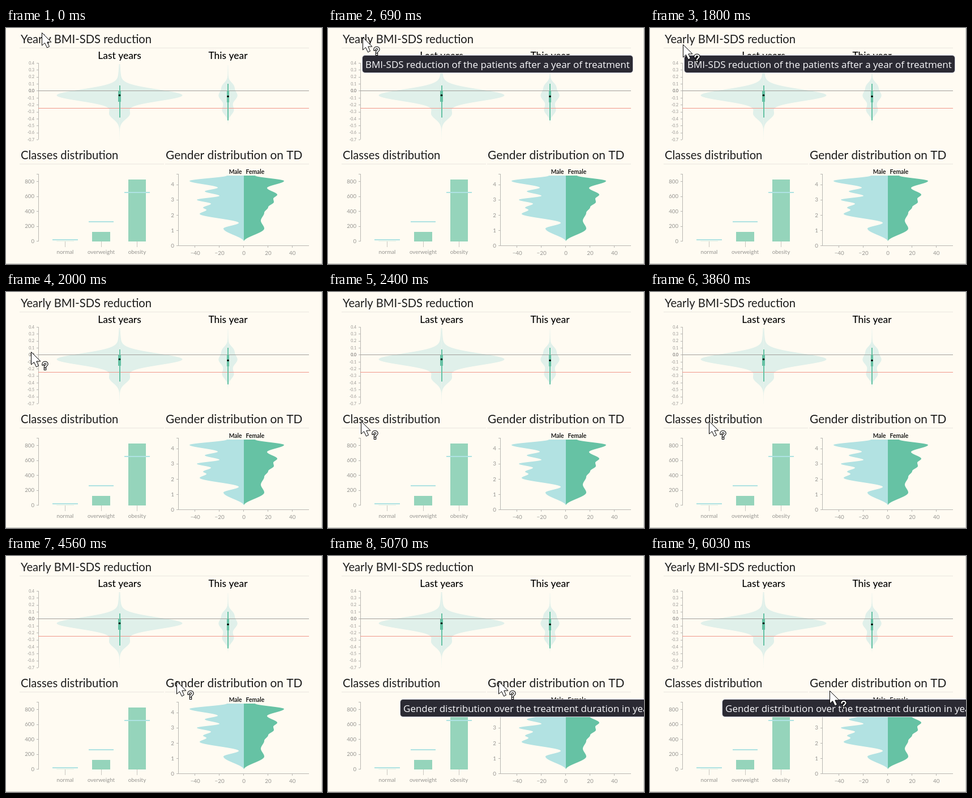
An HTML page with a canvas for the animation above (6.13 s loop, 558 by 419 pixels).

```html
<!DOCTYPE html>
<html lang="en">
<head>
<meta charset="utf-8">
<title>Treatment dashboard</title>
<style>
  html, body { margin: 0; width: 100%; height: 100%; overflow: hidden; background: #fffbf2; }
  canvas { display: block; }
</style>
</head>
<body>
<canvas id="stage" width="558" height="419"></canvas>
<script>
const ctx = document.getElementById('stage').getContext('2d');
const LOOP = 6130, STEP = 100;
const SANS = 'Lato, sans-serif';
const GREEN = '#66c2a4', AQUA = '#b2e2e2', AXIS = '#b9b7b2', LABEL = '#969591';

const smooth = p => p * p * (3 - 2 * p);

// Width as a sum of bell curves, each [height, centre, spread].
const density = bells => y =>
  bells.reduce((sum, [h, c, s]) => sum + h * Math.exp(-((y - c) ** 2) / (2 * s * s)), 0);

// Width that eases between turning points, each [width, y].
const turns = points => y => {
  const i = Math.max(1, points.findIndex(p => p[1] >= y));
  const [a, y0] = points[i - 1], [b, y1] = points[i];
  return a + (b - a) * smooth((y - y0) / (y1 - y0));
};

const lastYears = density([[107, 119.5, 10.3], [16, 153, 9], [4, 115, 30]]);
const thisYear = density([[16, 120, 9.5], [7, 102, 6], [10, 146, 8], [0.8, 100, 22]]);
const male = turns([[30, 262], [96, 271.5], [46, 283.5], [69, 290], [43, 298], [83, 305], [58, 312],
  [72, 319], [66, 323], [78, 330], [9, 346], [36, 356], [0, 379]]);
const female = turns([[20, 262], [71, 271.5], [41, 284], [59, 296], [52, 303], [53, 309], [43, 318],
  [36, 328], [30, 342], [36, 356], [0, 379]]);

const moves = [
  { at: 0, steps: 1, to: [61, 16] },
  { at: 1700, steps: 7, to: [58, 229], bow: [-17, 6] },
  { at: 3660, steps: 7, to: [289, 216], bow: [0, 4] },
  { at: 4360, steps: 2, to: [301, 222] },
  { at: 5930, steps: 1, to: [317, 239] }
];

const tips = [
  { from: 690, to: 1900, x: 61, y: 49, w: 477, label: 'BMI-SDS reduction of the patients after a year of treatment' },
  { from: 2950, to: 3860, x: 43, y: 259, w: 560, label: 'Distribution of the obesity classes (normal, overweight, and obesity)' },
  { from: 5070, to: LOOP, x: 128, y: 255, w: 480, label: 'Gender distribution over the treatment duration in years' }
];

function text(str, x, y, size, { color = LABEL, align = 'left', weight = 400, family = SANS } = {}) {
  ctx.font = `${weight} ${size}px ${family}`;
  ctx.fillStyle = color;
  ctx.textAlign = align;
  ctx.fillText(str, x, y);
}

function rect(x, y, w, h, color) {
  ctx.fillStyle = color;
  ctx.fillRect(x, y, w, h);
}

const hLine = (x1, x2, y, color = AXIS, h = 1) => rect(x1, y, x2 - x1, h, color);
const vLine = (x, y1, y2, color = AXIS, w = 1) => rect(x, y1, w, y2 - y1, color);

function heading(str, x, y, size, lineFrom, lineTo) {
  text(str, x, y, size, { color: '#1c1c1c' });
  hLine(lineFrom, lineTo, y + 8, '#e9e6df');
}

// Fills one side of a centre line; sign is -1 for left, 1 for right.
function side(width, center, sign, top, bottom, color) {
  ctx.beginPath();
  ctx.moveTo(center, top);
  for (let y = top; y <= bottom; y += 0.5) ctx.lineTo(center + sign * width(y), y);
  ctx.lineTo(center, bottom);
  ctx.fillStyle = color;
  ctx.fill();
}

function violin(width, center, top, bottom) {
  for (const sign of [-1, 1]) side(width, center, sign, top, bottom, '#e0f0ea');
}

function boxPlot(x, top, bottom, boxWidth, boxBottom, median) {
  vLine(x - 1, top, bottom, GREEN, 2);
  rect(x - Math.ceil(boxWidth / 2), 112, boxWidth, boxBottom - 112, GREEN);
  ctx.beginPath();
  ctx.arc(x - boxWidth % 2 / 2, median, 1.8, 0, Math.PI * 2);
  ctx.fillStyle = '#000';
  ctx.fill();
}

function yAxis(x, top, bottom, zeroY, gap, labels, size) {
  vLine(x, top, bottom);
  hLine(x - 3, x, top);
  labels.forEach((label, i) => {
    const y = zeroY - i * gap;
    hLine(x - 3, x, Math.round(y));
    text(label, x - 7, y + size * 0.38, size, { align: 'right', color: label === '0.0' ? '#555' : LABEL });
  });
}

function drawReduction() {
  heading('Yearly BMI-SDS reduction', 26, 27, 20.2, 24, 535);
  violin(lastYears, 200.5, 64, 198);
  violin(thisYear, 392, 66, 180);
  const labels = Array.from({ length: 12 }, (_, i) => ((i - 7) / 10).toFixed(1));
  yAxis(57, 62, 198, 198, 12.36, labels, 7);
  hLine(57, 535, 111, '#a09f9b');
  hLine(57, 535, 142, '#f0968a');
  boxPlot(201, 102, 159, 5, 131, 119.5);
  boxPlot(392, 99, 164, 4, 132, 121.5);
  const style = { color: '#000', align: 'center', weight: 500 };
  text('Last years', 200.5, 55, 17.4, style);
  text('This year', 392, 55, 17.4, style);
}

function drawClasses() {
  heading('Classes distribution', 26, 233, 20.2, 24, 279);
  yAxis(57, 259, 379, 378, 26.5, [0, 200, 400, 600, 800], 9.6);
  const bars = [['normal', 378.7, 375], ['overweight', 362, 343], ['obesity', 269, 291]];
  bars.forEach(([name, top, mark], i) => {
    const x = 104.5 + i * 63.5;
    const left = Math.ceil(x - 16), right = Math.floor(x + 16);
    rect(left, top, right - left, 379 - top, '#95d4bb');
    vLine(Math.floor(x), 379, 389, '#c9c7c1');
    hLine(Math.ceil(x - 22.5), Math.floor(x + 22.5), mark, '#aee2e2', 2);
    text(name, x, 401, 9.8, { align: 'center' });
  });
}

function drawGender() {
  heading('Gender distribution on TD', 282, 233, 20.9, 281, 535);
  side(male, 420, -1, 262, 379, AQUA);
  side(female, 420, 1, 262, 379, GREEN);
  yAxis(304, 259, 387, 386, 27.1, [0, 1, 2, 3, 4], 9.8);
  hLine(304, 535, 386);
  for (let i = -2; i <= 2; i++) {
    const x = 420 + i * 42.9;
    vLine(Math.round(x) - 1, 387, 390);
    text(String(i * 20).replace('-', '\u2212'), x, 403, 9.8, { align: 'center' });
  }
  text('Male', 416.5, 259, 10.4, { color: '#000', align: 'right', weight: 600 });
  text('Female', 423.5, 259, 10.4, { color: '#000', weight: 600 });
}

function drawTip({ x, y, w, label }) {
  ctx.beginPath();
  ctx.roundRect(x, y, w, 30, 4);
  ctx.fillStyle = '#2b2a33';
  ctx.fill();
  ctx.beginPath();
  ctx.roundRect(x - 0.5, y - 0.5, w + 1, 31, 4.5);
  ctx.strokeStyle = '#cfcfd8';
  ctx.lineWidth = 1;
  ctx.stroke();
  text(label, x + 5, y + 22, 17, { color: '#fbfbfe', family: '"Open Sans", sans-serif' });
}

function pointerAt(t) {
  let pos = [63, 8];
  for (const { at, steps, to, bow = [0, 0] } of moves) {
    if (t < at) break;
    const p = smooth(Math.min(1, Math.floor((t - at) / STEP) / steps));
    pos = pos.map((from, i) => Math.round(from + (to[i] - from) * p + bow[i] * Math.sin(Math.PI * p)));
  }
  return pos;
}

function drawPointer([x, y], help) {
  ctx.save();
  ctx.translate(x + 0.5, y + 0.5);
  const arrow = new Path2D('M0 0V22.5L5 18L9 26.5L13 24.5L9.3 16.5H16.5Z');
  ctx.fillStyle = '#fff';
  ctx.fill(arrow);
  ctx.strokeStyle = '#000';
  ctx.lineWidth = 1;
  ctx.stroke(arrow);
  if (help) {
    const mark = new Path2D('M21 21.7C21 17.3 28 17.3 28 21.5C28 24 24.5 24 24.5 26.5M24.5 29.8V30.4');
    ctx.lineCap = 'square';
    for (const [color, width] of [['#000', 4.4], ['#fff', 2.2]]) {
      ctx.strokeStyle = color;
      ctx.lineWidth = width;
      ctx.stroke(mark);
    }
  }
  ctx.restore();
}

function draw(t) {
  rect(0, 0, 558, 419, '#fffbf2');
  drawReduction();
  drawClasses();
  drawGender();
  vLine(557, 0, 419, '#d2d0ca');
  hLine(0, 558, 418, '#c4c2bd');
  const tip = tips.find(({ from, to }) => t >= from && t < to);
  if (tip) drawTip(tip);
  drawPointer(pointerAt(t), t >= STEP);
}

const start = performance.now();
function tick() {
  draw((performance.now() - start) % LOOP);
  requestAnimationFrame(tick);
}
tick();
</script>
</body>
</html>
```
